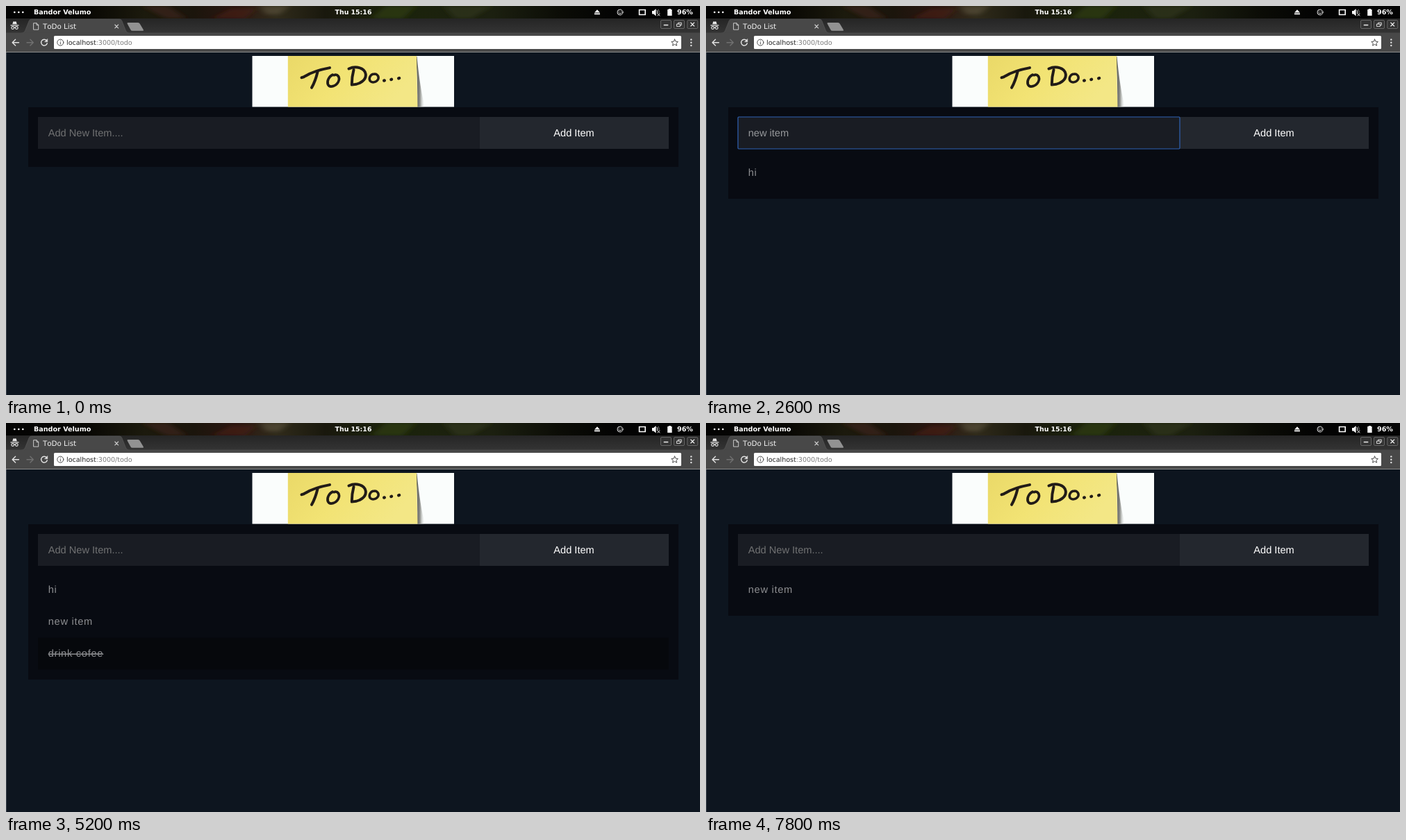
Write an HTML page that moves like this. It is 999x561 px and loops after 9100 ms.

```html
<!DOCTYPE html>
<html lang="en">
<head>
<meta charset="utf-8">
<title>ToDo List</title>
<style>
html, body { margin: 0; width: 100%; height: 100%; overflow: hidden; background: #0d151f; }
svg { display: block; width: 999px; height: 561px; }
text { white-space: pre; text-rendering: geometricPrecision; }
.bar { font: bold 9.6px "DejaVu Sans", sans-serif; fill: #fff; }
.ui { font: 9.5px "DejaVu Sans", sans-serif; }
.page { font: 14.62px "Liberation Sans", Arial, sans-serif; }
.item { letter-spacing: .731px; fill: #8e8f92; }
.tip { font: 10.24px "Noto Sans", "Open Sans", sans-serif; fill: #f0f1f3; }
.line { fill: none; stroke-linecap: round; stroke-linejoin: round; }
</style>
</head>
<body>
<svg viewBox="0 0 999 561" xmlns="http://www.w3.org/2000/svg">
  <defs>
    <linearGradient id="wall">
      <stop offset="0" stop-color="#030303"/>
      <stop offset=".12" stop-color="#090804"/>
      <stop offset=".2" stop-color="#1c1a0d"/>
      <stop offset=".27" stop-color="#1b150c"/>
      <stop offset=".33" stop-color="#2b1711"/>
      <stop offset=".39" stop-color="#302b1b"/>
      <stop offset=".46" stop-color="#19180d"/>
      <stop offset=".56" stop-color="#1b230b"/>
      <stop offset=".7" stop-color="#1c2010"/>
      <stop offset=".8" stop-color="#0b0c06"/>
      <stop offset=".88" stop-color="#030303"/>
    </linearGradient>
    <linearGradient id="tabs" x2="0" y2="1">
      <stop offset="0" stop-color="#252525"/>
      <stop offset="1" stop-color="#343434"/>
    </linearGradient>
    <linearGradient id="note" x2="1" y2=".35">
      <stop offset="0" stop-color="#ead968"/>
      <stop offset=".5" stop-color="#f2e374"/>
      <stop offset="1" stop-color="#f3e786"/>
    </linearGradient>
    <linearGradient id="shade">
      <stop offset="0" stop-color="#4d4d48"/>
      <stop offset=".45" stop-color="#8f918c"/>
      <stop offset="1" stop-color="#fafdfc" stop-opacity="0"/>
    </linearGradient>
    <filter id="blur" x="-30%" y="-80%" width="160%" height="260%"><feGaussianBlur stdDeviation="5 2"/></filter>
    <clipPath id="top"><path d="M0 0h999v18H0z"/></clipPath>
  </defs>

  <path fill="#0d151f" d="M0 0h999v561H0z"/>

  <!-- desktop bar -->
  <path fill="url(#wall)" d="M0 0h999v18H0z"/>
  <g clip-path="url(#top)" filter="url(#blur)">
    <path fill="#3b2418" opacity=".7" d="M196 0h38l26 18h-30z"/>
    <path fill="#4a1b18" opacity=".6" d="M296 18l28-14h36l-16 14z"/>
    <path fill="#5b543d" opacity=".6" d="M366 0h42l-14 12h-20z"/>
    <path fill="#33420f" opacity=".6" d="M526 18l20-18h44l-18 18z"/>
    <path fill="#363d20" opacity=".5" d="M630 0h70l-30 18h-24z"/>
  </g>
  <g fill="#fff">
    <circle cx="12.3" cy="9" r="1.3"/><circle cx="18.3" cy="9" r="1.3"/><circle cx="24.3" cy="9" r="1.3"/>
    <path d="M847 9.4l4-4.2 4 4.2zM847 10.6h8v1.7h-8z"/>
    <path d="M930 7h2.2l3.4-3v10.4l-3.4-3H930z"/>
    <path d="M953.8 4h3.2v1h1.6v9h-6.4V5h1.6z"/>
  </g>
  <g class="line" stroke="#fff">
    <path stroke-width="1.6" stroke-linejoin="miter" d="M911.6 5.5h8.6v7h-8.6z"/>
    <circle cx="884" cy="9" r="4" stroke-width=".9"/>
    <path stroke-width=".9" d="M882.5 7.6v.3M885.5 7.6v.3M881.8 10q2.2 2.4 4.4 0"/>
    <path stroke-width="1" d="M937.2 6.5q1 2 .3 4M938 11l3 3m0-3l-3 3"/>
    <path stroke="#aaa" stroke-width=".8" d="M939 5q1.6 2.4 1 5"/>
  </g>
  <text class="bar" x="40" y="11.6">Bandor Velumo</text>
  <text class="bar" x="500" y="12.4" text-anchor="middle" style="font-size:9.4px">Thu 15:16</text>
  <text class="bar" x="966" y="12.4">96%</text>

  <!-- tab strip -->
  <path fill="url(#tabs)" d="M0 18h999v21H0z"/>
  <path fill="#484848" d="M0 38.5h999V66H0z"/>
  <path fill="#484848" stroke="#5d5d5d" stroke-width=".6" d="M24 38.8q2.500 -.4 3.500-3l5.500-14q1-2.800 3.500-2.800h127q2.500 0 3.500 2.800l5.500 14q1 2.600 3.500 3"/>
  <path fill="#484848" d="M22 38.400h156v2H22z"/>
  <path fill="#929292" d="M175.500 24h14.500q1.800 0 2.600 1.600l5.200 8.600q.8 1.500-1 1.500h-15q-1.600 0-2.400-1.500l-4.800-8.600q-.7-1.600.9-1.600z"/>
  <g fill="#e8e8e8">
    <path d="M9.200 26.300l1.100-3.500q.3-.7 1-.5l1.200.4 1.200-.4q.7-.2 1 .5l1.100 3.500zM6.500 27.300h12v1.100h-12z"/>
  </g>
  <g class="line" stroke="#e8e8e8" stroke-width="1.100">
    <circle cx="9.700" cy="31.500" r="1.900"/><circle cx="15.300" cy="31.500" r="1.900"/><path d="M11.600 31.200q.9-.6 1.800 0"/>
    <path stroke="#d8d8d8" stroke-width=".9" d="M40 24.700h4l2.700 2.700v6.700H40zM44 24.700v2.700h2.700"/>
    <path stroke="#cfcfcf" d="M156.800 27l4.800 4.800m0-4.800l-4.800 4.800"/>
  </g>
  <text class="ui" x="53" y="32.900" fill="#f2f2f2" style="font-size:10.300px;font-kerning:none">ToDo List</text>

  <!-- window buttons -->
  <g id="buttons" fill="#343434" stroke="#6b6b6b" stroke-width=".9"></g>
  <g class="line" stroke="#eee" stroke-width="1.100">
    <path stroke-width="1.500" d="M947.300 27.500h5.400"/>
    <path stroke-width=".9" d="M965.800 26h4.600v3.400h-4.600zM967.600 26v-1.900h4.700v3.600h-1.900"/>
    <path d="M985.700 24l5 5m0-5l-5 5"/>
  </g>

  <!-- toolbar -->
  <g class="line" stroke-width="1.400" stroke="#e2e2e2">
    <path d="M18.500 52.700H9.400M13.600 48.300l-4.400 4.400 4.400 4.400"/>
    <path stroke="#707070" d="M30 52.700h9.100M34.900 48.300l4.400 4.400-4.400 4.400"/>
    <path d="M58.300 49.600a4.400 4.400 0 1 0 1 4.200"/>
    <path fill="#e2e2e2" stroke-width=".5" d="M59.800 47.700v4h-4z"/>
  </g>
  <rect x="69" y="43" width="903" height="19" rx="1.500" fill="#fff"/>
  <g class="line" stroke="#4d4d4d" stroke-width="1">
    <circle cx="78.300" cy="52.600" r="4.500"/><path d="M78.300 52.300v2.600M78.300 50.200v.1"/>
    <path d="M962.600 48l1.400 3.100 3.400.4-2.500 2.300.7 3.300-3-1.700-3 1.700.7-3.300-2.500-2.300 3.400-.4z"/>
  </g>
  <text class="ui" x="87" y="56.200" fill="#222">localhost<tspan fill="#7c7c7c">:3000/todo</tspan></text>
  <g fill="#e2e2e2"><circle cx="986.300" cy="48.400" r="1.200"/><circle cx="986.300" cy="52.700" r="1.200"/><circle cx="986.300" cy="57" r="1.200"/></g>
  <path fill="#8c8c8c" d="M0 66h999v1H0z"/>
  <path fill="#59606a" opacity=".6" d="M0 67h1v494H0z"/>

  <!-- banner -->
  <path fill="#fafdfc" d="M354.500 72H645v73.500H354.500z"/>
  <path fill="url(#shade)" d="M590 73q3 40 2 72.500h11q-7-26-11.500-72.500z"/>
  <path fill="url(#note)" d="M405.800 72H591q.6 40 1.500 73.500H405.800z"/>
  <g class="line" stroke="#211b17" stroke-width="4">
    <path d="M425.500 103.300q3-.5 6-2.600 12-7.400 34.500-11.600"/>
    <path d="M448.500 95q-3 13-8.500 22.800"/>
    <path stroke-width="3.700" d="M470 99.200c-5 2.300-8.500 9-6.500 14 2.500 5.200 11.500 2.600 14.800-3.700 3.200-6.500-.8-11.800-6.300-9.800"/>
    <path d="M500.500 92q-2.800 11-2.700 20.500"/>
    <path d="M493.500 90.500c10-4.500 22.500-1.500 24.200 7.500 1.300 8.500-8.200 15.300-19.900 15.600"/>
    <path stroke-width="3.500" d="M528.500 98.200c-5 1.600-6.500 7-4.300 9.900 3 3.500 9.800 1.600 11.600-2.700 1.500-4.600-2.300-7.800-6-7.200"/>
    <path stroke-width="4.400" d="M544.200 107.600l.6-.2M554.400 106l.6-.2M565.200 104.300l.9-.3"/>
  </g>

  <!-- list -->
  <rect id="panel" x="32" y="146" width="936" fill="#080b12"/>
  <rect id="mark" x="46" width="908" height="46" fill="#06080c"/>
  <path fill="#191c23" d="M46 160h636v46H46z"/>
  <path fill="#23272e" d="M682 160h272v46H682z"/>
  <rect id="focus" x="46" y="160" width="636" height="46" rx="1.200" fill="none" stroke="#2f62b4" stroke-width="1.200"/>
  <text id="field" class="page" x="60.700" y="187.800"></text>
  <text class="page" x="817.500" y="187.800" text-anchor="middle" fill="#fff">Add Item</text>
  <g id="items"></g>
  <g id="tip">
    <path fill="#3b4452" d="M241 207h116v21H241z"/>
    <text class="tip" x="247" y="220.700">Please fill in this field.</text>
  </g>
</svg>
<script>
const ROW = 46, STEP = 1300;
const $ = id => document.getElementById(id);
const states = [
  { items: [] },
  { items: ["click to remove"], tip: true },
  { items: ["hi"], typed: "new item" },
  { items: ["hi", "new item", "drink cofee"] },
  { items: ["hi", "new item", "drink cofee"], hover: 2 },
  { items: ["hi", "new item"], hover: 0 },
  { items: ["new item"] }
];

$("buttons").innerHTML = [942.5, 961.5, 980.8]
  .map(x => `<rect x="${x}" y="20.500" width="15" height="12" rx="1.500"/>`).join("");

const show = (id, on) => $(id).setAttribute("visibility", on ? "visible" : "hidden");

function itemText(label, i, hover) {
  const strike = i === hover ? ' text-decoration="line-through"' : "";
  return `<text class="page item" x="60.700" y="${245.3 + ROW * i}"${strike}>${label}</text>`;
}

function draw({ items, hover = -1, typed = "", tip = false }) {
  $("panel").setAttribute("height", 86 + ROW * items.length);
  $("items").innerHTML = items.map((label, i) => itemText(label, i, hover)).join("");
  $("mark").setAttribute("y", 217.5 + ROW * Math.max(hover, 0));
  show("mark", hover >= 0);
  show("tip", tip);
  show("focus", typed);
  $("field").textContent = typed || "Add New Item....";
  $("field").setAttribute("fill", typed ? "#96989b" : "#707172");
}

let shown = -1;
const start = performance.now();
function tick() {
  const t = Math.max(0, performance.now() - start) % (STEP * states.length);
  const now = Math.floor(t / STEP);
  if (now !== shown) draw(states[shown = now]);
  requestAnimationFrame(tick);
}
tick();
</script>
</body>
</html>
```
